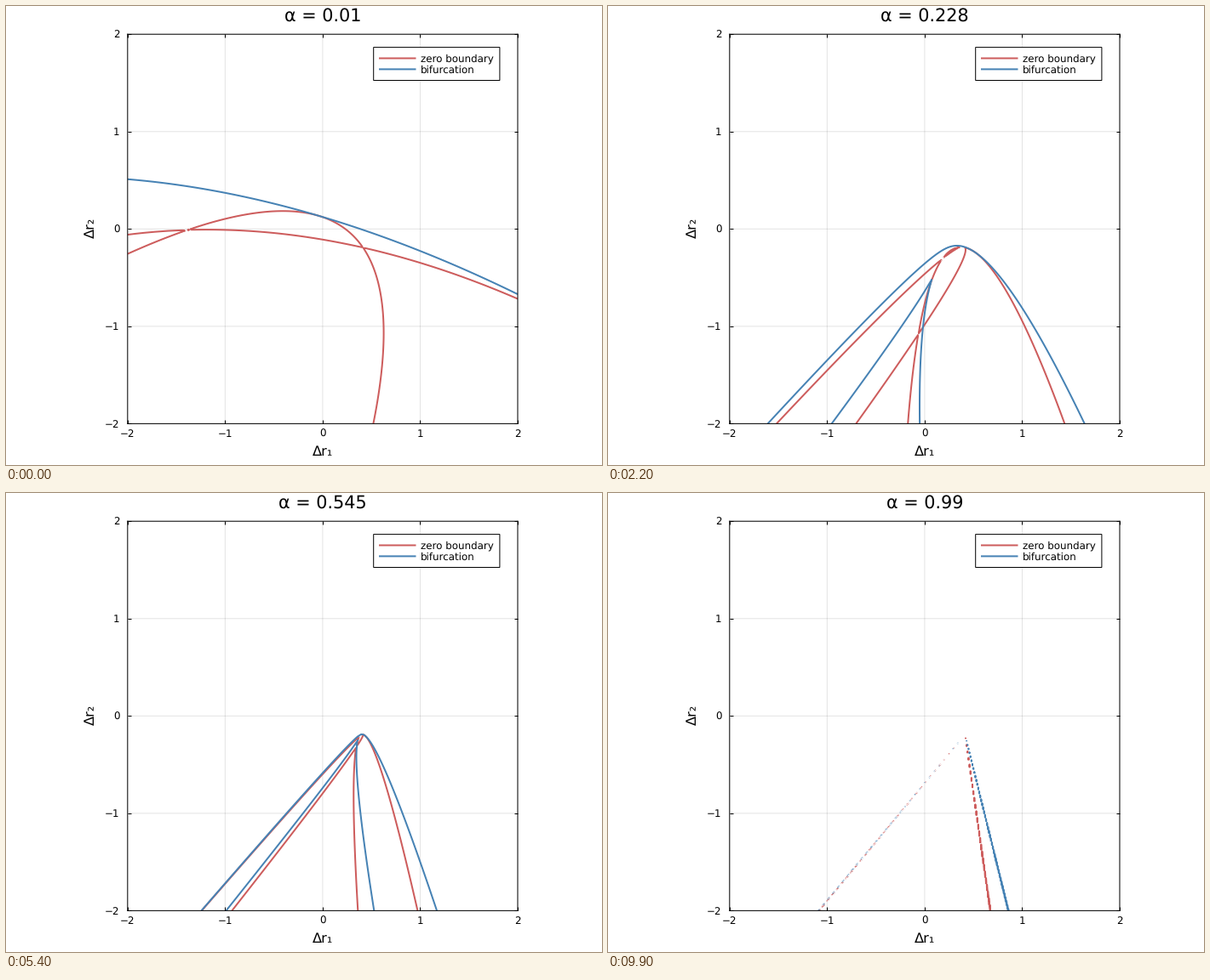
A matplotlib script that plays this animation: 700 px wide and 540 px high, repeating every 10000 ms.

```python
import numpy as np
import matplotlib.pyplot as plt
from matplotlib.animation import FuncAnimation
from matplotlib.patches import Rectangle

W, H, DPI = 700, 540, 100
FRAMES, INTERVAL = 100, 100
RED, BLUE = "#cd5c5c", "#4682b4"
PX = 72 / DPI  # points per pixel
LEFT, TOP, SIDE = 142.8, 33.2, 458.2
UNIT = SIDE / 4
MID_X, MID_Y = LEFT + SIDE / 2, TOP + SIDE / 2

# Tiny contour loops must survive, and lines keep their subpixel places
plt.rcParams.update({"font.family": "DejaVu Sans", "text.hinting": "none",
                     "path.simplify": False, "path.snap": False})

# Equilibria of two species with linear and quadratic interactions:
#   t^2 + LAM t s + e (P1 t + Q1 s) = X
#   s^2 + MU  t s + e (P2 t + Q2 s) = Y,   e = (1 - alpha) / sqrt(alpha)
LAM, MU = 0.14, -0.631
P1, Q1 = 0.4669, 0.1926
P2, Q2 = -0.3802, -0.0688
APEX = (0.414, -0.1915)
BX, CX = 0.1436, -0.8265  # x parts of the two quadratic directions

xs = np.linspace(-2, 2, 401)
ys = np.linspace(-2, 0.6, 261)
gx, gy = np.meshgrid(xs - APEX[0], ys - APEX[1])
Y = -(gx + BX * gy) / (BX - CX)
X = -gy - Y


def mul(p, q):
    out = [0] * (len(p) + len(q) - 1)
    for i, a in enumerate(p):
        for j, b in enumerate(q):
            out[i + j] = out[i + j] + a * b
    return out


def zero_boundary(e):
    """Product of the two parabolas where one species vanishes."""
    g = e * e
    first = Y**2 + g * P2 * (P1 * Y - P2 * X)
    second = X**2 + g * Q1 * (Q2 * X - Q1 * Y)
    return first * second


def bifurcation(e):
    """Discriminant of the quartic left after eliminating t."""
    num = [Y, -e * Q2, -1]
    den = [e * P2, MU]
    terms = (mul(num, num),
             mul(mul([e * P1, LAM], den), num),
             mul([-X, e * Q1], mul(den, den)) + [0])
    k0, k1, k2, k3, k4 = (a + b + c for a, b, c in zip(*terms))
    i = 12 * k4 * k0 - 3 * k3 * k1 + k2 * k2
    j = (72 * k4 * k2 * k0 + 9 * k3 * k2 * k1 - 27 * k4 * k1 * k1
         - 27 * k0 * k3 * k3 - 2 * k2 * k2 * k2)
    # remove the spurious squared factor of the elimination
    s = -e * P2 / MU
    extra = Y - e * Q2 * s - s * s
    return (4 * i * i * i - j * j) / (extra * extra + 1e-18)


fig = plt.figure(figsize=(W / DPI, H / DPI), dpi=DPI, facecolor="white")

ax = fig.add_axes([LEFT / W, 1 - (TOP + SIDE) / H, SIDE / W, SIDE / H])
ax.set(xlim=(-2, 2), ylim=(-2, 2), xticks=range(-2, 3), yticks=range(-2, 3))
ax.set_axisbelow(True)
ax.grid(color="black", alpha=0.11, lw=PX)
ax.tick_params(direction="in", length=4 * PX, width=PX, top=True, right=True,
               labelbottom=False, labelleft=False)
for spine in ax.spines.values():
    spine.set_linewidth(PX)

# Pixel coordinates for labels and legend
stage = fig.add_axes([0, 0, 1, 1], facecolor="none")
stage.set(xlim=(0, W), ylim=(H, 0))
stage.axis("off")


def label(x, y, text, size, ha="center", **kw):
    return stage.text(x, y, text, fontsize=size * PX, ha=ha,
                      va="baseline", **kw)


SMALL, GUIDE, TITLE = 11.87, 16.3, 20.75
for v in range(-2, 3):
    name = str(v).replace("-", "\u2212")
    label(MID_X + UNIT * v, 507.2, name, SMALL)
    label(133.6, MID_Y - UNIT * v + 4.2, name, SMALL, ha="right")
label(MID_X, 528.6, "Δr₁", GUIDE)
label(103.4, 261.2, "Δr₂", GUIDE, rotation=90, rotation_mode="anchor")
title = label(MID_X, 18.2, "", TITLE)

stage.add_patch(Rectangle((431.7, 48.6), 148.2, 38.9, fc="white", ec="black",
                          lw=PX))
for y, color, name in ((61.5, RED, "zero boundary"),
                       (74.4, BLUE, "bifurcation")):
    stage.plot([438, 481.5], [y, y], color=color, lw=2 * PX,
               solid_capstyle="butt")
    label(487, y + 4.4, name, SMALL, ha="left")

curves = []


def update(k):
    alpha = 0.01 + 0.98 * k / (FRAMES - 1)
    e = (1 - alpha) / np.sqrt(alpha)
    while curves:
        curves.pop().remove()
    for field, color in ((zero_boundary, RED), (bifurcation, BLUE)):
        curves.append(ax.contour(xs, ys, field(e), levels=[0], colors=[color],
                                 linewidths=2 * PX))
    title.set_text(f"α = {round(alpha, 3)}")
    return []


anim = FuncAnimation(fig, update, frames=FRAMES, interval=INTERVAL,
                     repeat=True, repeat_delay=0)
plt.show()
```
